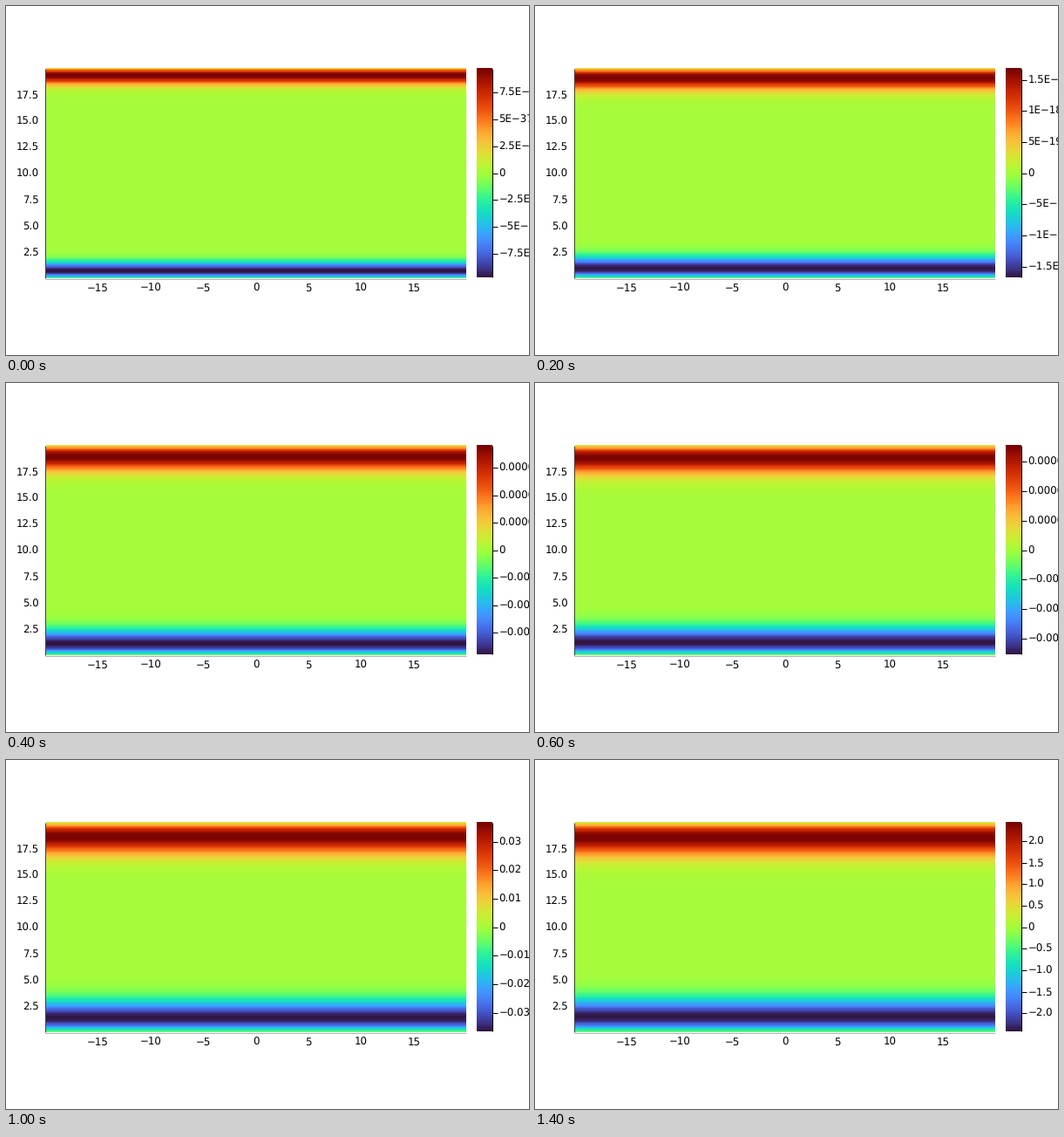
These frames come from a looping animation (600x400 px, 1500 ms). A matplotlib script:

```python
import math

import matplotlib.pyplot as plt
import numpy as np
from matplotlib.animation import FuncAnimation

W, H, DPI = 600, 400, 100
FRAMES, INTERVAL = 15, 100

plt.rcParams.update({
    "font.family": "DejaVu Sans",
    "font.size": 11.8 * 72 / DPI,
    "text.hinting": "none",
})

# Plot area and colour bar in pixels, y pointing down
LEFT, RIGHT, TOP, BOTTOM = 46, 528, 71.8, 312.2
BAR_LEFT, BAR_RIGHT, BAR_TOP, BAR_BOTTOM = 540, 558, 72, 311.3
BAR_MID = (BAR_TOP + BAR_BOTTOM) / 2
X0, Y0, SCALE = 286.8, 312.8, 12.08
LINE = 72 / DPI

# Height of the channel and the cell centres of the grid
DEPTH = 20
ROWS = np.linspace(0.1, 19.9, 199)

# Decimal logarithm of the field's peak, one per frame
LOG_PEAK = [-36.013, -25.7, -17.775, -12.9, -9.42, -7.2, -5.45, -4.45,
            -3.53, -2.42, -1.436, -0.85, -0.32, 0.08, 0.384]


def layer(dist, width):
    return dist * np.exp(-dist**2 / (2 * width**2))


def field(frame):
    """Antisymmetric boundary layers, scaled to a peak of one."""
    width = 1.61 - 0.86 * math.exp(-frame / 6.4)
    values = layer(DEPTH - ROWS, width) - layer(ROWS, width)
    return (values / np.abs(values).max())[:, None]


def tick_step(peak):
    """Return the mantissa and the exponent of the tick spacing."""
    exponent = math.floor(math.log10(peak))
    lead = peak / 10**exponent
    for limit, mantissa in ((1.2, 0.25), (2.5, 0.5), (5, 1), (7.5, 2)):
        if lead < limit:
            return mantissa, exponent
    return 2.5, exponent


def minus(text):
    return text.replace("-", "\u2212")


def tick_label(n, mantissa, exponent):
    if n == 0:
        return "0"
    size = abs(n) * mantissa
    if exponent < -11:
        shift = math.floor(math.log10(size))
        text = f"{size / 10**shift:g}E{exponent + shift}"
    else:
        extra = {0.25: 2, 0.5: 1, 2.5: 1}.get(mantissa, 0)
        text = f"{size * 10.0**exponent:.{max(0, extra - exponent)}f}"
    return minus("-" + text if n < 0 else text)


fig = plt.figure(figsize=(W / DPI, H / DPI), dpi=DPI, facecolor="white")
ax = fig.add_axes([0, 0, 1, 1])
ax.set_axis_off()


def picture(data, left, right, top, bottom):
    # The limits keep near-zero values of both signs in one colour
    return ax.imshow(data, cmap="turbo", vmin=-1.01, vmax=0.99,
                     origin="lower", extent=(left, right, bottom, top),
                     aspect="auto", interpolation="nearest")


def line(xs, ys, color="black", width=LINE):
    return ax.plot(xs, ys, color=color, lw=width, solid_capstyle="butt")[0]


heat = picture(field(0), LEFT, RIGHT, TOP, BOTTOM)
picture(np.linspace(-1, 1, 256)[:, None],
        BAR_LEFT, BAR_RIGHT, BAR_TOP, BAR_BOTTOM)

line([45, 45], [TOP, 312], "#404040")
line([45, RIGHT], [313, 313], "#808080", 0.6 * LINE)
line([558, 558], [BAR_TOP, BAR_BOTTOM])

for x in range(-15, 16, 5):
    ax.text(X0 + SCALE * x, 324, minus(str(x)), ha="center", va="center")
for y in np.arange(2.5, 18, 2.5):
    ax.text(37.7, Y0 + 0.8 - SCALE * y, f"{y:.1f}", ha="right", va="center")

marks = [line([558, 564], [BAR_MID, BAR_MID]) for _ in range(11)]
labels = [ax.text(565.4, BAR_MID, "", va="center") for _ in range(11)]

ax.set_xlim(0, W)
ax.set_ylim(H, 0)


def update(frame):
    heat.set_data(field(frame))
    peak = 10 ** LOG_PEAK[frame]
    mantissa, exponent = tick_step(peak)
    step = mantissa * 10.0**exponent
    count = int(peak / step)
    for n, mark, label in zip(range(-5, 6), marks, labels):
        shown = abs(n) <= count
        mark.set_visible(shown)
        label.set_visible(shown)
        if shown:
            y = BAR_MID - n * step / peak * (BAR_BOTTOM - BAR_TOP) / 2
            mark.set_ydata([y, y])
            label.set_y(y + 0.5)
            label.set_text(tick_label(n, mantissa, exponent))
    return [heat, *marks, *labels]


anim = FuncAnimation(fig, update, frames=FRAMES, interval=INTERVAL,
                     repeat=True, repeat_delay=0, blit=False)
plt.show()
```
